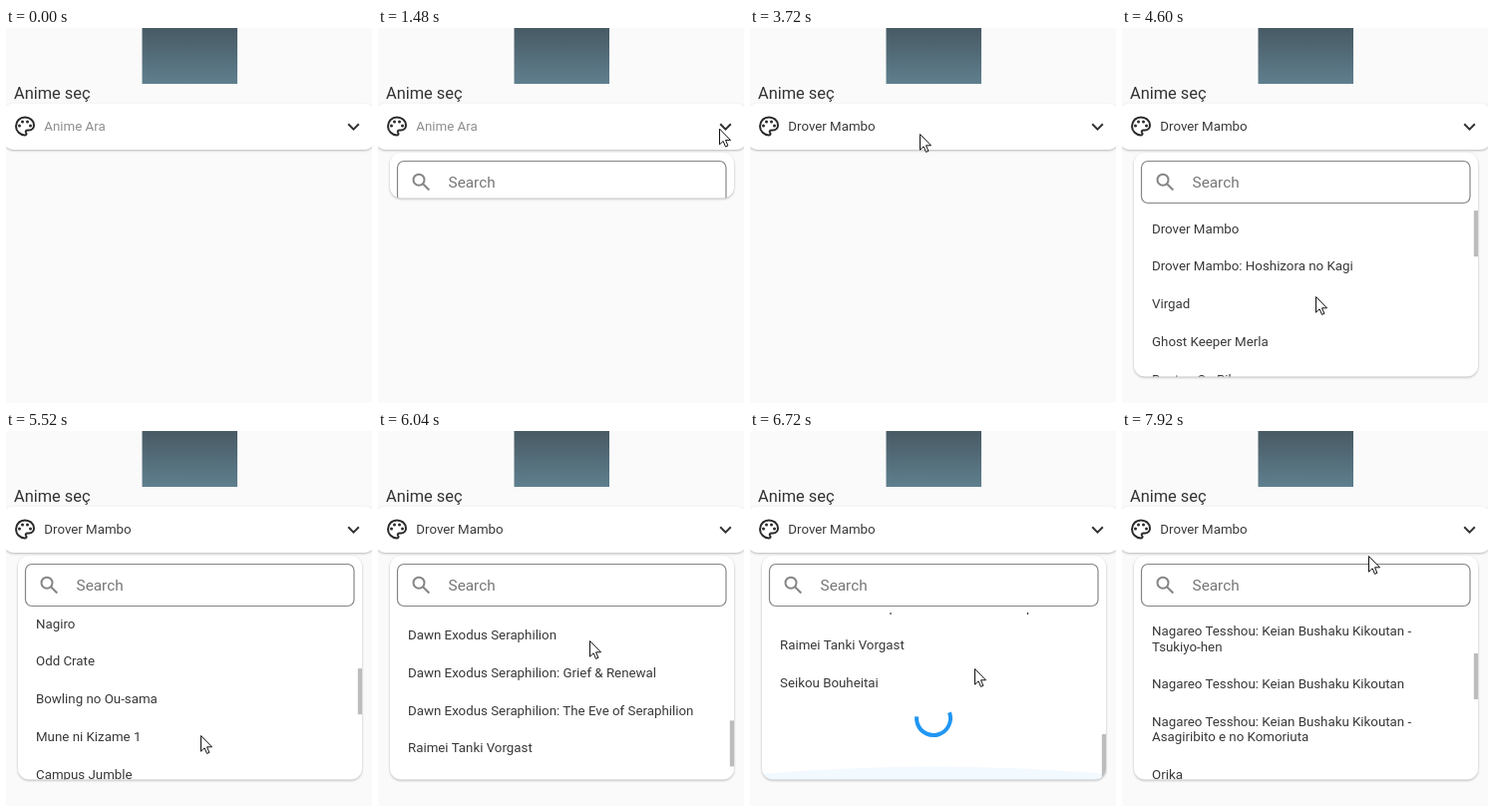
These frames come from a looping animation (367x376 px, 8 s). An HTML page:

```html
<!DOCTYPE html>
<html lang="tr">
<head>
<meta charset="utf-8">
<style>
html, body { margin: 0; width: 100%; height: 100%; overflow: hidden; background: #fafafa; }
svg { display: block; width: 100%; height: 100%; font: 13.3px Roboto, sans-serif; }
.card { fill: #fff; filter: drop-shadow(0 1px .8px #0004); }
.line { fill: none; stroke-width: 2; }
.dots { fill: none; stroke-width: 3; stroke-linecap: round; }
</style>
</head>
<body>
<svg viewBox="0 0 367 376">
  <defs>
    <linearGradient id="slate" x2="0" y2="1">
      <stop stop-color="#485a64"/><stop offset="1" stop-color="#5f7f8e"/>
    </linearGradient>
    <clipPath id="reveal"><rect id="revealBox" x="12" y="125" width="345" height="224.5" rx="11"/></clipPath>
    <clipPath id="view"><rect x="12" y="182" width="345" height="168"/></clipPath>
  </defs>

  <rect x="136.5" width="95.5" height="56" fill="url(#slate)"/>
  <text x="8" y="71" font-size="16.4" fill="#333">Anime seç</text>

  <rect class="card" x="-2" y="75.5" width="371" height="46.5" rx="9"/>
  <g transform="translate(7 86.4)" stroke="#2a2a2a">
    <path class="line" d="M12 3a9 9 0 0 0 0 18c1.5 0 1.9-1.4 1.1-2.4-.9-1.2 0-2.6 1.4-2.6H16c2.8 0 5-2.2 5-5 0-4.4-4-8-9-8z"/>
    <path class="dots" d="M6.5 11.5h0M9.5 7.5h0M14.5 7.5h0M17.5 11.5h0"/>
  </g>
  <text id="value" x="38.3" y="103.2"></text>
  <path class="line" d="M343.2 96.3l5.3 5.3 5.3-5.3" stroke="#333"/>

  <g id="panel">
    <rect id="sheet" class="card" x="12" y="125" width="345" height="224.5" rx="11"/>
    <g clip-path="url(#reveal)">
      <rect x="19.5" y="133.5" width="329.5" height="42" rx="6.5" fill="none" stroke="#858585" stroke-width="1.2"/>
      <path class="line" d="M45 156.2l6.3 6.3" stroke="#858585"/>
      <circle class="line" cx="41" cy="152.2" r="5.5" stroke="#858585"/>
      <text x="70.6" y="160" font-size="15.3" fill="#777">Search</text>
      <g clip-path="url(#view)">
        <g id="list" fill="#383838">
          <g id="rows"></g>
          <g id="more"></g>
          <circle id="spinner" cx="184" cy="1143" r="17" fill="none" stroke="#2196f3" stroke-width="4" pathLength="360"/>
        </g>
        <path id="glow" d="M12 350V344Q184 329 357 344V350Z" fill="#2196f3" fill-opacity=".06"/>
        <rect id="thumb" x="352.8" width="4.2" height="46" fill="#bcbcbc"/>
      </g>
    </g>
  </g>

  <path id="cursor" d="M.5 .5V16.2L4.1 12.8L6.5 18.4L8.9 17.4L6.5 11.8H11.5Z" fill="#fff" stroke="#111"/>
</svg>

<script>
const $ = id => document.getElementById(id);
const LOOP = 8000, ROW = 37.7, LINE = 15.3, HEIGHT = 224.5;
const pick = 'Drover Mambo', saga = 'Dawn Exodus Seraphilion', epic = 'Nagareo Tesshou: Keian Bushaku Kikoutan';

const firstPage = [
  pick, pick + ': Hoshizora no Kagi', 'Virgad', 'Ghost Keeper Merla', 'Bantou Ou Riku',
  'Goldvisor 34', 'Amaguri to Kasumi', 'Lonely Heel: Mad Kicker', 'Turbo K Third Circuit', 'Morvane',
  'Nagiro', 'Odd Crate', 'Bowling no Ou-sama', 'Mune ni Kizame 1', 'Campus Jumble',
  'Kazanmaru', 'Hexnovaria', 'Legacy Crimson', 'Kongari!! Oyatsu', 'Tanker',
  saga, saga + ': Grief & Renewal', saga + ': The Eve of Seraphilion', 'Raimei Tanki Vorgast', 'Seikou Bouheitai'
];
const nextPage = [epic + ' -|Tsukiyo-hen', epic, epic + ' -|Asagiribito e no Komoriuta', 'Orika'];

let rowY = 206.7;
function addRows(group, titles) {
  for (const title of titles) {
    const lines = title.split('|');
    lines.forEach((line, i) => {
      const text = document.createElementNS('http://www.w3.org/2000/svg', 'text');
      text.setAttribute('x', 30);
      text.setAttribute('y', rowY + i * LINE);
      text.textContent = line;
      group.append(text);
    });
    rowY += ROW + (lines.length - 1) * LINE;
  }
}
addRows($('rows'), firstPage);
addRows($('more'), nextPage);

const ramp = (t, start, length) => Math.min(1, Math.max(0, (t - start) / length));
const easeOut = p => p * (2 - p);
const smooth = p => p * p * (3 - 2 * p);

// Pointer moves: start, length, x, y
const moves = [
  [480, 520, 342, 99], [1400, 800, 343, 156], [2240, 360, 112, 198], [2600, 200, 95, 206],
  [3000, 520, 170, 106], [4000, 560, 194, 269], [4600, 300, 205, 127], [4960, 520, 195, 305],
  [5600, 240, 218, 142], [5840, 200, 212, 210], [6040, 260, 218, 310], [6320, 200, 232, 159],
  [6520, 200, 225, 238], [7640, 280, 247, 125]
];
const pointer = t => moves.reduce(([x, y], [start, length, toX, toY]) => {
  const p = smooth(ramp(t, start, length));
  return [x + (toX - x) * p, y + (toY - y) * p];
}, [352, 240]);

// Flicks of the list: start, length, distance
const flicks = [[4600, 840, 386], [5600, 680, 417], [6320, 200, 52], [7640, 280, 89]];
const scrolled = t => flicks.reduce((sum, [start, length, way]) => sum + way * easeOut(ramp(t, start, length)), 0);

const set = (id, name, value) => $(id).setAttribute(name, value);
const show = (id, on) => set(id, 'display', on ? 'inline' : 'none');

function draw(now) {
  const t = now % LOOP, offset = scrolled(t);
  const open = ramp(t, 1400, 400) - ramp(t, 3000, 320) + ramp(t, 3800, 400);
  const picked = t >= 3120, loaded = t >= 7400;

  $('value').textContent = picked ? pick : 'Anime Ara';
  set('value', 'fill', picked ? '#3a3a3a' : '#8f8f8f');

  show('panel', open > 0);
  set('sheet', 'height', HEIGHT * open);
  set('revealBox', 'height', HEIGHT * open);
  set('list', 'transform', `translate(0 ${-offset})`);
  set('thumb', 'y', 183 + Math.min(121, offset / (loaded ? 23.6 : 7)));
  set('glow', 'opacity', ramp(t, 6400, 160) - ramp(t, 6800, 320));

  show('more', loaded);
  show('spinner', !loaded);
  const spin = t - 6720, arc = 205 + 60 * Math.sin(spin / 212);
  set('spinner', 'stroke-dasharray', `${arc} ${360 - arc}`);
  set('spinner', 'transform', `rotate(${spin * .3 - 20} 184 1143)`);

  show('cursor', t > 480);
  set('cursor', 'transform', `translate(${pointer(t)})`);
  requestAnimationFrame(draw);
}
requestAnimationFrame(draw);
</script>
</body>
</html>
```
